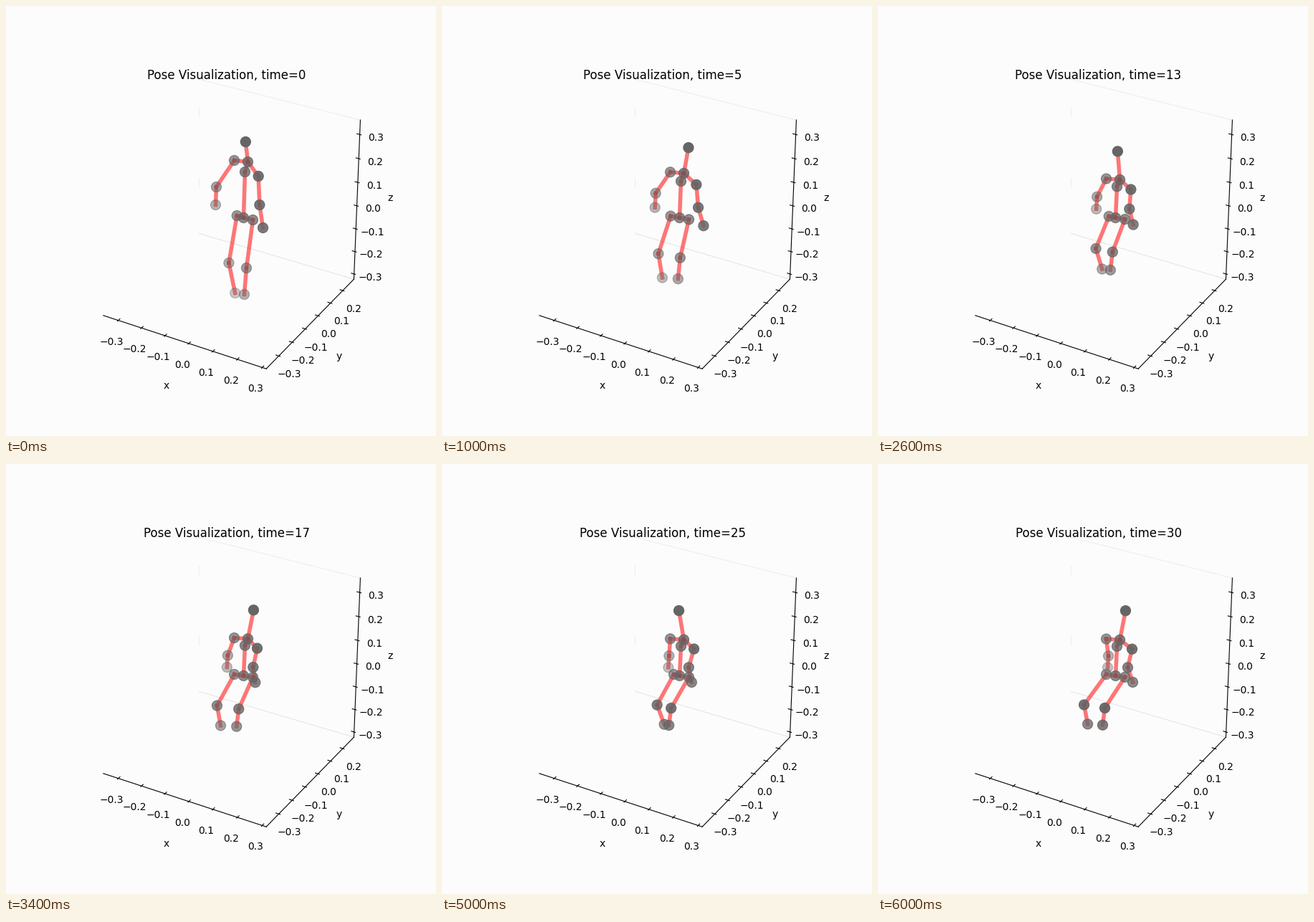
These frames come from a looping animation (600 px wide and 600 px high, 6200 ms). A matplotlib script:

```python
import numpy as np
import matplotlib.pyplot as plt
from matplotlib.animation import FuncAnimation

FRAMES, STEP = 31, 200
PELVIS = np.array([331.5, 295.5])

plt.rcParams["font.family"] = "DejaVu Sans"
fig = plt.figure(figsize=(6, 6), dpi=100, facecolor="#fcfcfc")
ax = fig.add_axes([0, 0, 1, 1])
ax.set(xlim=(0, 600), ylim=(600, 0))
ax.axis("off")

# Perspective camera at elevation 30, azimuth -60; the box is centred on 0.
BOX = np.array([1.05, 1.053, 1.038])
LIMITS = np.array([(-0.365, 0.316), (-0.3916, 0.293), (-0.3233, 0.3594)])
ELEV, AZIM = np.radians(30), np.radians(-60)
RIGHT = np.array([-np.sin(AZIM), np.cos(AZIM), 0])
EYE = np.array([np.cos(ELEV) * np.cos(AZIM), np.cos(ELEV) * np.sin(AZIM), np.sin(ELEV)])
UP = np.cross(EYE, RIGHT)


def project(p):
    """Box coordinates in -0.5..0.5 to stage pixels."""
    q = np.asarray(p) * BOX
    scale = 2497 / (10 - q @ EYE)
    return np.array([313.5 + scale * (q @ RIGHT), 296.7 - scale * (q @ UP)])


def segment(a, b, color="black"):
    ax.plot(*zip(a, b), color=color, lw=0.8, zorder=1)


def label(x, y, s, size=10):
    return ax.text(x, y, s, fontsize=size, ha="center", va="baseline")


def draw_axis(k, edge, tick_dir, first, last, shift):
    """Axis k along a box edge, with crossing ticks and shifted labels."""
    ends = np.array([edge, edge], float)
    ends[:, k] = -0.5, 0.5
    segment(project(ends[0]), project(ends[1]))
    lo, hi = LIMITS[k]
    for n in range(first, last + 1):
        p = np.array(edge, float)
        p[k] = (n / 10 - lo) / (hi - lo) - 0.5
        out = np.zeros(3)
        out[tick_dir] = np.sign(p[tick_dir]) / 120
        segment(project(p + out), project(p - 2 * out))
        x, y = project(p) + shift
        label(x, y, f"{n / 10:.1f}".replace("-", "\u2212"))


def draw_stage():
    for z, color in ((-0.5, "#e6e6e6"), (0.5, "#eeeeee")):
        segment(project((-0.5, 0.5, z)), project((0.5, 0.5, z)), color)
    for y in (142, 240):
        segment((268.5, y), (268.5, y + 12), "#eeeeee")
    draw_axis(0, (0, -0.5, -0.5), 1, -3, 3, (-9.3, 34))
    draw_axis(1, (0.5, 0, -0.5), 0, -3, 2, (14.8, 30))
    draw_axis(2, (0.5, 0.5, 0), 0, -3, 3, (22.8, 8.6))
    label(224, 534, "x")
    label(465, 493, "y")
    label(536, 272, "z")


class Limb:
    """Chain of joints, given by its rest points relative to the pelvis."""

    def __init__(self, root, points, shade, drift=0, sway=0, period=13,
                 squash=1.0, rise=0.0):
        self.root, self.points = root, np.array(points, float)
        n = len(points)
        self.shade = np.linspace(*shade, n)
        self.outer = np.minimum(np.arange(n), 1)
        self.weight = np.arange(1, n + 1) / n
        self.drift, self.sway, self.period = drift, sway, period
        self.squash, self.rise = squash, rise

    def pose(self, i):
        t = i / (FRAMES - 1)
        height = 0.64 + 0.36 * np.exp(-i / 6)
        swing = self.sway * np.sin(2 * np.pi * (i - 0.5) / self.period)
        x, y = self.points.T
        x = x + self.drift * t * self.outer + swing * self.weight
        return PELVIS + np.column_stack([x, y * height**self.squash])

    def alpha(self, i):
        t = i / (FRAMES - 1)
        return np.clip(self.shade + self.rise * t * self.outer, 0, 1)


# Trunk first; the root index says which trunk joint a limb hangs from.
trunk = Limb(None, [(0, 0), (2, -64), (6, -78)], (0.75, 0.8))
limbs = [
    Limb(2, [(5, -106)], (1, 1), sway=9, squash=0.35),
    Limb(2, [(-13, -80), (-38, -43), (-39, -18)], (0.68, 0.47), drift=28, rise=-0.1),
    Limb(2, [(21, -58), (23, -18), (28, 14)], (0.92, 0.85), drift=-10, sway=8,
         period=26, rise=-0.1),
    Limb(0, [(-10, -3), (-22, 63), (-14, 105)], (0.66, 0.35), drift=-16, sway=-9,
         rise=0.4),
    Limb(0, [(13, 3), (4, 70), (1, 107)], (0.73, 0.48), drift=-19, rise=0.35),
]

draw_stage()
title = label(307.5, 101.6, "", 12)
bone_count = len(trunk.points) - 1 + sum(len(limb.points) for limb in limbs)
bones = [ax.plot([], [], color="red", alpha=0.53, lw=4, zorder=2)[0]
         for _ in range(bone_count)]
dots = ax.scatter([], [], s=100, zorder=3)


def update(i):
    core = trunk.pose(i)
    chains, points, alphas = [core], [core], [trunk.alpha(i)]
    for limb in limbs:
        pose = limb.pose(i)
        chains.append(np.vstack([core[limb.root], pose]))
        points.append(pose)
        alphas.append(limb.alpha(i))
    pairs = [pair for chain in chains for pair in zip(chain, chain[1:])]
    for line, (a, b) in zip(bones, pairs):
        line.set_data(*zip(a, b))
    dots.set_offsets(np.vstack(points))
    dots.set_color([(0.395, 0.395, 0.395, a) for a in np.concatenate(alphas)])
    title.set_text(f"Pose Visualization, time={i}")
    return [*bones, dots, title]


anim = FuncAnimation(fig, update, frames=FRAMES, interval=STEP, repeat=True, repeat_delay=0)
plt.show()
```
